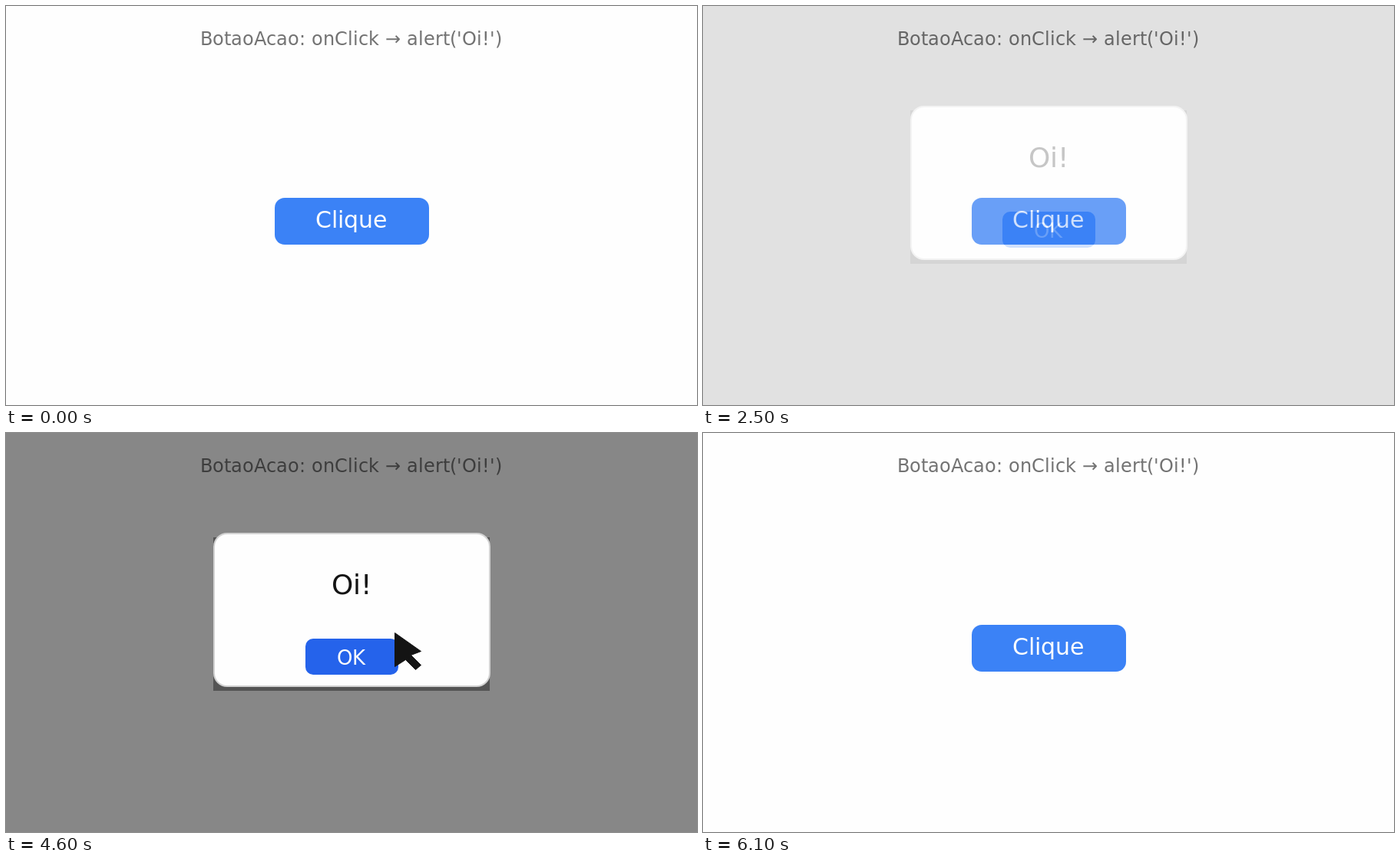
Recreate the animation shown at these times as an HTML page with a canvas. Size 900 by 520 pixels, loop 7.46 s.

```html
<!DOCTYPE html>
<html lang="pt">
<head>
<meta charset="utf-8">
<title>BotaoAcao</title>
<style>
  html, body { margin: 0; width: 100%; height: 100%; overflow: hidden; background: #fefefe; }
  canvas { display: block; }
</style>
</head>
<body>
<canvas id="stage" width="900" height="520"></canvas>
<script>
const W = 900, H = 520, LOOP = 7460;
const BLUE = '#3b82f6', PRESSED = '#2563eb', INK = '#141414', PAPER = '#fefefe';
const stage = document.getElementById('stage').getContext('2d');

// Start time and modal opacity (0-255) of each fade step
const FADE = [
  [0, 0], [2500, 60], [2700, 110], [2900, 160], [3100, 210], [3300, 255],
  [5460, 180], [5620, 120], [5780, 60], [5940, 0]
];

const within = (t, from, to) => t >= from && t < to;

function roundRect(c, x, y, w, h, r, color) {
  c.fillStyle = color;
  c.beginPath();
  c.roundRect(x, y, w, h, r);
  c.fill();
}

// Centered text whose letters advance by whole pixels
function label(c, text, baseline, size, color) {
  c.font = size + 'px "DejaVu Sans", sans-serif';
  c.fillStyle = color;
  const steps = [...text].map(ch => Math.round(c.measureText(ch).width));
  let x = Math.floor(W / 2 - steps.reduce((a, b) => a + b, 0) / 2);
  [...text].forEach((ch, i) => {
    c.fillText(ch, x, baseline);
    x += steps[i];
  });
}

function drawPage(c, color) {
  c.fillStyle = PAPER;
  c.fillRect(0, 0, W, H);
  label(c, "BotaoAcao: onClick → alert('Oi!')", 51, 24, '#737373');
  roundRect(c, 350, 250, 201, 61, 13, color);
  label(c, 'Clique', 289, 30, PAPER);
}

function drawModal(c, color) {
  drawPage(c, BLUE);
  c.fillStyle = 'rgba(0, 0, 0, 0.471)';
  c.fillRect(0, 0, W, H);
  c.fillStyle = 'rgba(0, 0, 0, 0.38)';
  c.fillRect(270, 136, 360, 200);
  roundRect(c, 270, 130, 361, 201, 18, '#d2d2d2');
  roundRect(c, 272, 132, 357, 197, 16, PAPER);
  label(c, 'Oi!', 210, 36, INK);
  roundRect(c, 390, 268, 121, 47, 10, color);
  label(c, 'OK', 302, 26, PAPER);
}

function drawCursor(c, x, y) {
  const shape = [[0, 0], [34, 24], [21, 29], [34, 42], [27, 48], [14, 35], [0, 44]];
  c.fillStyle = c.strokeStyle = INK;
  c.lineWidth = 1;
  c.beginPath();
  for (const [dx, dy] of shape) c.lineTo(x + dx + 0.5, y + dy + 0.5);
  c.closePath();
  c.fill();
  c.stroke();
}

function modalLayer(color) {
  const layer = document.createElement('canvas');
  layer.width = W;
  layer.height = H;
  drawModal(layer.getContext('2d'), color);
  return layer;
}

const modal = modalLayer(BLUE), modalPressed = modalLayer(PRESSED);

function render(t) {
  drawPage(stage, within(t, 1800, 2500) ? PRESSED : BLUE);
  const alpha = FADE.filter(([start]) => t >= start).pop()[1] / 255;
  if (alpha > 0) {
    stage.globalAlpha = alpha;
    stage.drawImage(within(t, 4600, 5300) ? modalPressed : modal, 0, 0);
    stage.globalAlpha = 1;
  }
  if (within(t, 900, 2500)) drawCursor(stage, 546, 246);
  if (within(t, 3500, 5300)) drawCursor(stage, 506, 260);
}

const begin = performance.now();
function tick() {
  render((performance.now() - begin) % LOOP);
  requestAnimationFrame(tick);
}
tick();
</script>
</body>
</html>
```
